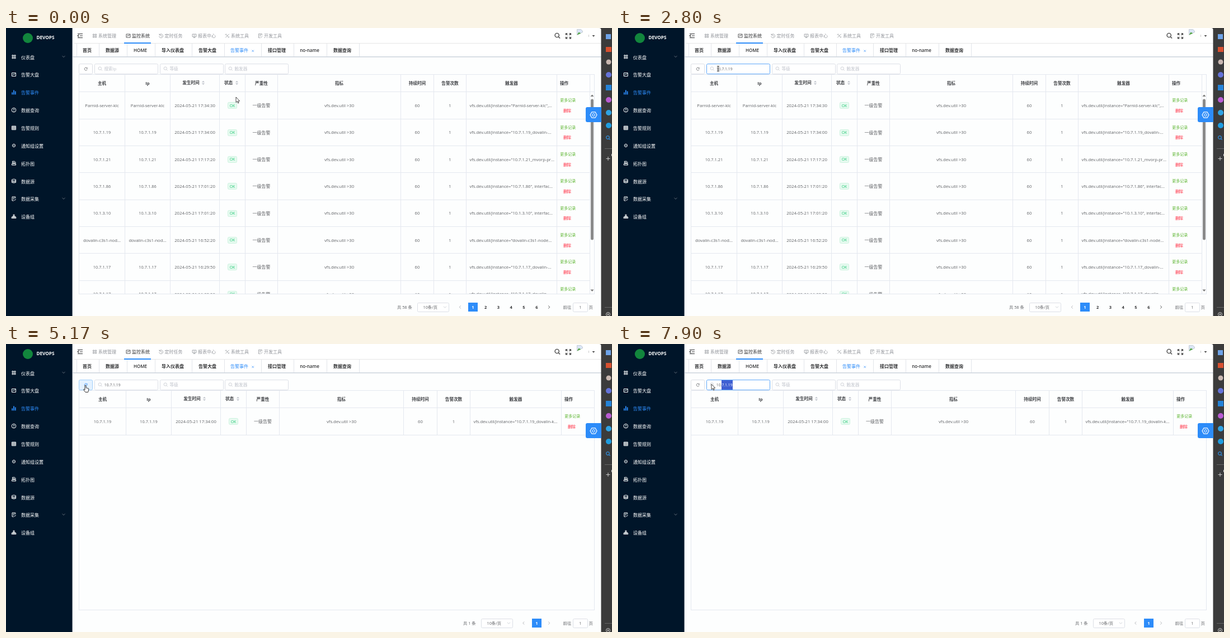
Animation of 1083 by 517 pixels, one loop 8000 ms. Source, as an HTML page:

```html
<!DOCTYPE html>
<html lang="zh-CN">
<head>
<meta charset="utf-8">
<title>告警事件</title>
<style>
html, body { margin: 0; width: 100%; height: 100%; overflow: hidden; background: #fff; }
svg { display: block; }
#stage { width: 1083px; height: 517px; }
text { font-family: "Open Sans", "Noto Sans CJK SC", "Noto Sans CJK", sans-serif; white-space: pre; }
</style>
</head>
<body>
<svg id="stage" viewBox="0 0 1083 517"></svg>
<script>
const BLUE = '#2d8cf9', FOCUS = '#5fa8fa', INK = '#303133', BODY = '#606266', GREY = '#909399', PALE = '#c0c4cc', LINE = '#e4e8ef', SELECT = '#3f5fd2';

// Drawing helpers; every one returns markup
const rect = (x, y, w, h, fill) => `<rect x="${x}" y="${y}" width="${w}" height="${h}" fill="${fill}"/>`;
const path = (d, stroke, width = 1, fill = 'none', at = [0, 0]) =>
  `<path transform="translate(${at})" d="${d}" stroke="${stroke}" stroke-width="${width}" fill="${fill}"/>`;
const dot = (x, y, r, fill, stroke = 'none') => `<circle cx="${x}" cy="${y}" r="${r}" fill="${fill}" stroke="${stroke}"/>`;
const text = (x, y, s, fill = BODY, size = 7.7, anchor = 'start', weight = 400) =>
  `<text x="${x}" y="${y + size * .36}" fill="${fill}" font-size="${size}" text-anchor="${anchor}" font-weight="${weight}">${s}</text>`;
const mid = (x, y, s, fill, size, weight) => text(x, y, s, fill, size, 'middle', weight);
const box = (x, y, w, h, stroke = '#dcdfe6', fill = '#fff') =>
  `<rect x="${x + .5}" y="${y + .5}" width="${w}" height="${h}" rx="2" fill="${fill}" stroke="${stroke}"/>`;
const lens = (x, y, r, color, width) => path(`M${-r} 0a${r} ${r} 0 1 1 ${2 * r} 0a${r} ${r} 0 1 1 ${-2 * r} 0M${r * .7} ${r * .7}l${r * .8} ${r * .8}`, color, width, 'none', [x, y]);
const chevron = (x, y, dx, dy, color = GREY) =>
  path(dx ? `M${-dx} -2.5L${dx} 0L${-dx} 2.5` : `M-2.5 ${-dy}L0 ${dy}L2.5 ${-dy}`, color, .8, 'none', [x, y]);

const ICONS = {
  grid: 'M-3-3h2.2v2.2h-2.2zM.8-3h2.2v2.2h-2.2zM-3 .8h2.2v2.2h-2.2zM.8 .8h2.2v2.2h-2.2z',
  chart: 'M-3.5-3h7v6h-7zM-2 1l1.6-2 1.2 1 1.6-2',
  bars: 'M-2.8 4v-4M0 4v-8M2.8 4v-6',
  help: 'M-3.8 0a3.8 3.8 0 1 1 7.6 0a3.8 3.8 0 1 1-7.6 0M-1-1q1-1.5 2 0q0 .6-1 1.2v.6M0 1.8v.8',
  table: 'M-3.5-3h7v6.5h-7zM-3.5-1h7M-3.5 1.2h7M-1.2-3v6.5M1.2-3v6.5',
  cog: 'M0-2.8l2.4 1.4v2.8l-2.4 1.4-2.4-1.4v-2.8zM-1 0h2',
  page: 'M-2.5-3.5h4l1.5 1.5v2h-5.5zM-3.5 1h7v2.3h-7zM-1.2-1.5h2.5',
  disks: 'M-3.5-2.5q3.5-1.8 7 0v5.2q-3.5 1.6-7 0zM-3.5-.8q3.5 1.6 7 0M-3.5 1q3.5 1.6 7 0',
  note: 'M2.8-.8v-2.7h-5.8v7h3M-1.5-1.5h3M-1.5 .5h2M1 3.5l2.5-3',
  tree: 'M-1-3.2h2v2h-2zM-3.8 1.2h2v2h-2zM-1 1.2h2v2h-2zM1.8 1.2h2v2h-2zM0-1v2M-2.8 1v-1h5.6v1',
  clock: 'M-2.5-2a3.4 3.4 0 1 1-.8 2.8M-3-3.5v2h2M0-1.5v2l1.5 .6',
  screen: 'M-3.4-3h6.8v4.6h-6.8zM0 1.6v1.6M-2 3.2h4M-1.5-1h3',
  tools: 'M-3.2-3.2l6.4 6.4M3.2-3.2l-6.4 6.4M-3.5-1.5l2-2M1.5 3.5l2-2',
  spin: 'M2.2-1.2a2.5 2.5 0 1 0 .2 2M2.5-2.4v1.6h-1.6'
};
const icon = (name, x, y, color, width = .8) => path(ICONS[name], color, width, 'none', [x, y]);

function sidebar() {
  const items = [['grid', '仪表盘'], ['chart', '告警大盘'], ['bars', '告警事件'], ['help', '数据查询'], ['table', '告警规则'],
    ['cog', '通知组设置'], ['page', '拓扑图'], ['disks', '数据源'], ['note', '数据采集'], ['tree', '设备组']];
  let out = rect(118, 0, 2, 517, '#eceff2') + rect(120, 0, 2, 517, '#f6f8f9') + rect(0, 0, 118.5, 517, '#001529');
  out += dot(39, 18, 9, '#12863d') + text(54.4, 17.5, 'DEVOPS', '#fff', 8.2, 'start', 700);
  items.forEach(([name, label], i) => {
    const y = 52.7 + 31.85 * i, color = i == 2 ? BLUE : '#fff';
    out += icon(name, 14, y - 1, color, name == 'bars' ? 1.8 : 1) + text(27, y, label, color, 8, 'start', 500);
    if (i % 8 == 0) out += chevron(103, y - 1.5, 0, 1.3, '#76808b');
  });
  return out;
}

function header() {
  const menus = [['grid', '系统管理', 165], ['chart', '监控系统', 225], ['clock', '定时任务', 283.5], ['screen', '报表中心', 343], ['tools', '系统工具', 402], ['note', '开发工具', 461]];
  const edges = [126, 166, 216, 266, 332, 390, 456, 514, 573, 631];
  const tabs = ['首页', '数据源', 'HOME', '导入仪表盘', '告警大盘', '告警事件', '接口管理', 'no-name', '数据查询'];
  let out = path('M128 10.5h9M132 14h5M128 17.5h9M130.5 12l-2.5 2 2.5 2', INK, 1.2);
  out += rect(122, 27, 942, 1, '#e6e6e6') + rect(211, 26, 48, 2, BLUE);
  menus.forEach(([name, label, x], i) => {
    const color = i == 1 ? INK : GREY;
    out += icon(name, x - 6.5, 14, color) + text(x, 14, label, color, 8);
  });
  out += lens(984.7, 13, 3.6, '#444', 1.4);
  out += path('M-4.5-1.5v-3h3M1.5-4.5h3v3M4.5 1.5v3h-3M-1.5 4.5h-3v-3M-4-4l2.5 2.5M4-4l-2.5 2.5M4 4l-2.5-2.5M-4 4l2.5-2.5', '#444', 1.2, 'none', [1005, 14.3]);
  out += path('M1020.5 12.5v-10h7l3 3v2l-4 2z', '#b5bac2', .7, '#dbe6f6') + path('M1020.5 12.5l3-5 4 2z', 'none', 0, '#55a545');
  out += rect(1041, 12, 1, 4, '#ccc') + path('M1047.5 13h5l-2.5 2.8z', 'none', 0, '#444');
  edges.forEach(x => out += rect(x, 28, 1, 23, '#e2e5ea'));
  tabs.forEach((label, i) => {
    const active = i == 5;
    out += mid((edges[i] + edges[i + 1]) / 2 - (active ? 6 : 1), 40, label, active ? BLUE : INK, 8, active ? 400 : 600);
  });
  out += path('M439.5 39.5l3.4 3.4m0-3.4l-3.4 3.4', BLUE, .7);
  return out + rect(119, 51, 945, 1, '#ccd3dc') + rect(119, 52, 945, 1, '#e5e9ee');
}

function edgeBar() {
  let out = rect(1063.5, 0, 19.5, 517, '#3b3b3b') + path('M1060 0h4v4q0-4-4-4z', 'none', 0, '#3b3b3b');
  out += rect(1072, 11, 9, 9, '#6ea3e8') + rect(1072, 34, 10, 9, '#d8502f') + dot(1077, 61, 4.5, '#c9b7b0') + dot(1077, 84, 5, '#6573d8');
  out += rect(1072, 102, 10, 10, '#2583d8') + dot(1077, 129, 5, '#b95bd2') + dot(1077, 152, 5, '#2fa3e3') + dot(1077, 175, 5, '#1f9de0');
  out += lens(1075.5, 196.5, 2.8, '#2f8fe0', 1.2) + rect(1070, 216, 13, 1, '#666') + path('M1072.5 234.5h7M1076 231v7', '#ccc', 1);
  out += rect(1082, 226, 1, 4, '#ddd') + rect(1070, 501, 13, 1, '#666');
  return out + dot(1076, 514, 3.5, 'none', '#ccc') + dot(1076, 514, 1.3, '#ccc');
}

const gearButton = path('M1064 142h-25q-3 0-3 3v21q0 3 3 3h25z', 'none', 0, BLUE) +
  path('M-3-5.2h6l3 5.2-3 5.2h-6l-3-5.2z', '#fff', 1.2, 'none', [1050, 156]) + dot(1050, 156, 2.3, 'none', '#fff');

const QUERY = '10.7.1.19', KEY = 'vfs.dev.util{instance="', ORG = '_dovalin-';
const ROWS = [
  ['Parnid-server-klc', '17:34:30', 'Parnid-server-klc",...'],
  [QUERY, '17:34:00', QUERY + ORG + '...'],
  ['10.7.1.21', '17:17:20', '10.7.1.21_mvorp-pr...'],
  ['10.7.1.86', '17:01:20', '10.7.1.86", interfac...'],
  ['10.1.3.10', '17:01:20', '10.1.3.10", interfac...'],
  ['dovalin-c3s1-nod...', '16:52:20', 'dovalin-c3s1-node...'],
  ['10.7.1.17', '16:29:50', '10.7.1.17' + ORG + '...'],
  ['10.7.1.17', '16:28:50', '10.7.1.17' + ORG + '...']
];
const FOUND = [[QUERY, '17:34:00', QUERY + ORG + 'k...']];
const HEADS = ['主机', 'Ip', '发生时间', '状态', '严重性', '指标', '持续时间', '告警次数', '触发器'];
const ROW_H = 48.35, TOP = 114.5;
const hostSize = s => /^\d/.test(s) ? 7.4 : 7.7;

function table(rows, edges) {
  const center = i => (edges[i] + edges[i + 1] + 1) / 2, right = edges[9];
  let out = '', body = '';
  HEADS.forEach((label, i) => {
    const sortable = i == 2 || i == 3, x = center(i) - (sortable ? 7 : 0);
    out += mid(x, sortable ? 98 : 99.5, label, '#3c3e42', 7.6, 700);
    if (sortable) out += path('M-2.6-.8h5.2l-2.6-2.7zM-2.6 1h5.2l-2.6 2.7z', 'none', 0, PALE, [center(i) + 8 + (i == 2 ? 7 : 0), 98.3]);
  });
  out += text(right + 6, 99.5, '操作', '#3c3e42', 7.6, 'start', 700);
  rows.forEach(([host, time, trigger], i) => {
    const y = 139.3 + ROW_H * i;
    body += mid(center(0), y, host, BODY, hostSize(host)) + mid(center(1), y, host, BODY, hostSize(host));
    body += mid(center(2), y, '2024-05-21 ' + time);
    body += box(Math.round(center(3) - 8.5), Math.round(y) - 6, 16, 11, '#cdf3df', '#e7faf0') + mid(center(3), y, 'OK', '#1fc873', 6.8);
    body += mid(center(4), y, '一级告警', BODY, 8) + mid(center(5), y, 'vfs.dev.util &gt;30') + mid(center(6), y, '60') + mid(center(7), y, '1');
    body += text(edges[8] + 6.5, y, KEY + trigger, BODY, 7.55);
    body += text(right + 6.3, y - 9.5, '更多记录', '#5cb531', 7) + text(right + 12, y + 9, '删除', '#ff1f35', 7);
    body += rect(130, Math.round(TOP - .3 + ROW_H * (i + 1)), (edges[10] || 1051) - 130, 1, LINE);
  });
  const bottom = rows.length > 1 ? 477 : 163;
  edges.slice(1).forEach(x => out += rect(x, 83, 1, bottom - 83, LINE));
  out += rect(130, 83, 922, 1, LINE) + rect(130, 114, 922, 1, LINE) + rect(130, 477, 922, 1, LINE);
  out += rect(130, 83, 1, 395, LINE) + rect(1051, 83, 1, 395, LINE);
  return out + `<svg width="1083" height="477">${body}</svg>`;
}

function pager(total, totalX, selectX, prevX, firstX, pages) {
  let out = text(totalX, 501, `共 ${total} 条`, BODY, 7.3) + box(selectX, 493, 56, 16) + text(selectX + 10.5, 501, '10条/页', BODY, 7.3);
  out += chevron(selectX + 49.5, 501, 0, 1.2, PALE) + chevron(prevX, 501, -1.3, 0, '#a5a8ae') + chevron(970.5, 501, 1.3, 0, pages > 1 ? INK : '#a5a8ae');
  out += rect(firstX - 8, 493, 17, 16, BLUE);
  for (let i = 0; i < pages; i++) out += mid(firstX + .3 + 22.8 * i, 501, i + 1, i ? INK : '#fff', 7.5, 700);
  return out + text(995.5, 501, '前往', BODY, 7.4) + box(1013, 493, 26, 16) + mid(1026.3, 501, '1', BODY, 7.3) + text(1041.5, 501, '页', BODY, 7.4);
}

const scrollbar = path('M1044.5 123h6l-3-3.5z', 'none', 0, '#777') + path('M1044.5 469.5h6l-3 3.5z', 'none', 0, '#777') +
  '<rect x="1045" y="127.5" width="5" height="253" rx="2.5" fill="#8a8a8a"/>';

const frameParts = rect(122, 53, 942, 464, '#fdfefe') + sidebar() + header();
const overlay = edgeBar() + gearButton;
const fullList = table(ROWS, [130, 212, 293, 381, 427, 485, 705, 764, 822, 984, 1043]) + scrollbar + pager(58, 699, 735, 811.5, 834, 6);
const filtered = table(FOUND, [130, 214, 295, 383, 429, 488, 710, 770, 829, 992]) + pager(1, 817, 849, 925, 948, 1);

// Screen updates arrive in bursts: first, last, count
const TICKS = [[0, 0, 1], [150, 1160, 8], [1310, 2040, 6], [2340, 2340, 1], [2800, 2800, 1], [3360, 3360, 1], [3830, 3830, 1],
  [4410, 5320, 7], [5470, 6020, 5], [6320, 7320, 8], [7450, 7900, 4]]
  .flatMap(([a, b, n]) => Array.from({ length: n }, (_, i) => n > 1 ? a + (b - a) * i / (n - 1) : a));

// Pointer path: time, x, y, shape
const ARROW = 0, BEAM = 1, HAND = 2;
const POINTER = [[0, 411, 124, ARROW], [150, 405, 126, ARROW], [580, 225, 186, ARROW], [725, 187, 188, BEAM], [1160, 158, 188, BEAM],
  [1310, 160, 180, ARROW], [1890, 179, 76, BEAM], [2040, 179, 73, BEAM], [4400, 179, 73, BEAM], [4560, 166, 74, ARROW],
  [4710, 150, 74, HAND], [4860, 142, 74, HAND], [5320, 142, 74, HAND], [5600, 164, 76, ARROW], [5740, 182, 77, BEAM], [6020, 210, 77, BEAM],
  [6320, 216, 79, BEAM], [6600, 300, 96, HAND], [6890, 339, 103, HAND], [7030, 341, 108, HAND], [7170, 330, 107, HAND],
  [7320, 293, 106, HAND], [7450, 245, 88, ARROW], [7600, 206, 75, BEAM], [7900, 167, 72, ARROW]];
const SHAPES = [
  path('M0 0V9.6l2.2-2 1.5 3.4 1.5-.7-1.5-3.2h3z', '#000', .7, '#fff'),
  path('M-2-4.5h1.5l.5 .5 .5-.5h1.5M0-4v8M-2 4.5h1.5l.5-.5 .5 .5h1.5', '#111', .9),
  path('M-1 .9a1 1 0 0 1 2 0v3.8l4 .9q1 .3.9 1.4l-.6 3.2-.7 2.3h-4.7l-3.3-4.3q-.1-1.2 1-.9l1.4 1z', '#000', .8, '#fff')
];

function pointerAt(t) {
  const i = POINTER.findLastIndex(k => k[0] <= t), a = POINTER[i], b = POINTER[i + 1] || a;
  const f = b == a ? 0 : (t - a[0]) / (b[0] - a[0]);
  return { x: a[1] + (b[1] - a[1]) * f, y: a[2] + (b[2] - a[2]) * f, shape: a[3] };
}

const within = (t, ...spans) => spans.some(([a, b]) => t >= a && t < b);

function searchBar(t, pointer) {
  const hot = pointer.x < 156 && pointer.y < 84, typed = t >= 2340;
  const focused = within(t, [1890, 5100], [5870, 8000]);
  let out = box(130, 64, 24, 18, hot ? '#9fcffb' : '#dcdfe6', hot ? '#e4f2ff' : '#fff') + icon('spin', 142.7, 73.5, hot ? BLUE : BODY);
  [[158, '搜索Ip'], [275, '等级'], [391, '触发器']].forEach(([x, hint], i) => {
    out += box(x, 64, 113, 18, !i && focused ? FOCUS : '#dcdfe6') + lens(x + 9.8, 72.5, 2.7, PALE, .8);
    if (i || !typed) out += text(x + 17.5, 73.2, hint, PALE, 7.6);
  });
  if (typed) out += text(175.8, 73.2, QUERY, BODY, 6.8);
  if (t >= 7700) {
    const left = Math.max(185, pointer.x);
    out += rect(left, 65, 205 - left, 17, SELECT) +
      `<svg x="${left}" y="64" width="${205 - left}" height="19">${text(175.8 - left, 9.2, QUERY, '#fff', 6.8)}</svg>`;
  }
  if (within(t, [1890, 2800], [3360, 3830], [4410, 4860], [5870, 6460], [6890, 7320], [7450, 7700]))
    out += rect(typed ? 204 : 176, 68, 1, 11, '#333');
  return out;
}

function hostSelection(t, pointer) {
  if (!within(t, [800, 1890])) return '';
  const left = t < 1160 ? pointer.x : 155.5, host = mid(171.5 - left, 24.65, QUERY, '#fff', 7.4);
  return rect(left, 181, 187 - left, 13, SELECT) + `<svg x="${left}" y="163" width="${187 - left}" height="48">${host}</svg>`;
}

function scene(t) {
  const pointer = pointerAt(t), row = Math.floor((pointer.y - TOP) / ROW_H);
  const hover = row >= 0 && within(t, [150, 1300]) ? rect(131, Math.round(TOP + ROW_H * row), 912, 48, '#f5f7fa') : '';
  return rect(0, 0, 1083, 517, '#fff') + frameParts + hover + (t < 5100 ? fullList : filtered) + hostSelection(t, pointer) +
    searchBar(t, pointer) + overlay + `<g transform="translate(${pointer.x} ${pointer.y})">${SHAPES[pointer.shape]}</g>`;
}

const stage = document.getElementById('stage');
let shown = -1;
function draw() {
  const now = performance.now() % 8000, tick = TICKS.findLast(t => t <= now + 2);
  if (tick !== shown) stage.innerHTML = scene(shown = tick);
  requestAnimationFrame(draw);
}
draw();
</script>
</body>
</html>
```
